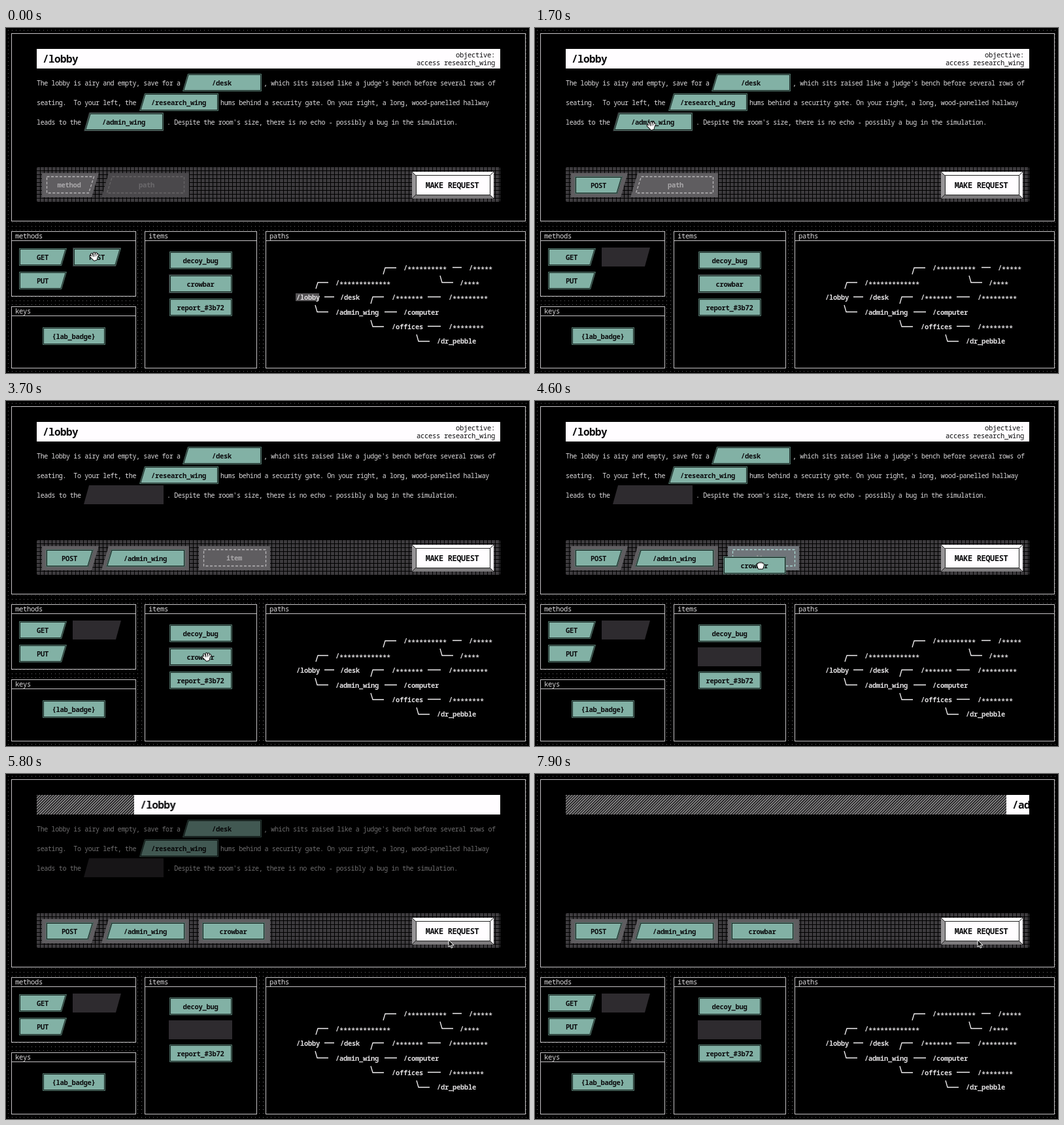
Write an HTML page that moves like this. It is 800 px wide and 528 px high and loops after 8 s.

```html
<!DOCTYPE html>
<html lang="en">
<head>
<meta charset="utf-8">
<title>Request game</title>
<style>
html, body { margin: 0; width: 100%; height: 100%; overflow: hidden; background: #000; }
svg { display: block; width: 800px; height: 528px; }
text { font: 10.5px "Noto Sans Mono", "DejaVu Sans Mono", monospace; letter-spacing: -.3px; fill: #dedcde; white-space: pre; }
.bold { font-weight: 600; }
.ink { fill: #0b0b0d; }
.mid { text-anchor: middle; }
.end { text-anchor: end; }
.story { font-size: 10px; letter-spacing: -.37px; }
.title { font-size: 16px; font-weight: 700; letter-spacing: -.6px; }
.make { font-size: 12px; font-weight: 600; letter-spacing: -.4px; }
.line { fill: #000; stroke: #c4c2c4; }
.tree { fill: none; stroke: #f4f2f4; stroke-width: 1.3; }
.dash { fill: none; stroke: #b8b6b8; stroke-width: 1.3; stroke-dasharray: 4 2.5; }
.hot { stroke: #a9d8d2; }
.faint { stroke: #676567; }
</style>
</head>
<body>
<svg viewBox="0 0 800 528">
  <defs>
    <pattern id="dots" width="6" height="6" patternUnits="userSpaceOnUse"><path d="M3 3h1v1h-1z" fill="#6a686a"/></pattern>
    <pattern id="grid" x="47" y="213" width="6" height="6" patternUnits="userSpaceOnUse"><path d="M0 0h5v5h-5z" fill="#3d3b3e"/></pattern>
    <pattern id="hatch" width="3" height="3" patternUnits="userSpaceOnUse" patternTransform="rotate(45)"><path d="M0 0h1.4v3h-1.4z" fill="#b4b2b4"/></pattern>
    <clipPath id="barClip"><rect x="47" y="32" width="709" height="30"/></clipPath>
  </defs>
  <g id="stage"></g>
</svg>
<script>
const LOOP = 8000;
const H = 27;
let css = '';

const pct = t => +(t * 100 / LOOP).toFixed(4) + '%';
const addAnim = (id, frames) =>
  css += `@keyframes ${id}{${frames}}#${id}{animation:${id} ${LOOP}ms steps(1) infinite}`;

// Visible only during the given [from, to] spans
const show = (id, ...spans) => addAnim(id, '0%{opacity:0}' +
  spans.map(([a, b]) => `${pct(a)}{opacity:1}${pct(b)}{opacity:0}`).join(''));

// Keys are [time, x, y, steps until the next key]
const move = (id, ...keys) => {
  const last = keys[keys.length - 1];
  addAnim(id, [...keys, [LOOP, last[1], last[2]]].map(([t, x, y, n = 1]) =>
    `${pct(t)}{transform:translate(${x}px,${y}px);animation-timing-function:steps(${n})}`).join(''));
};

const text = (x, y, s, cls = '') => `<text x="${x}" y="${y}" class="${cls}">${s}</text>`;
const group = (id, body) => `<g id="${id}">${body}</g>`;

// Quad with slanted left (l) or right (r) edge, shrunk by i
const quad = (x, y, w, h, l = 0, r = 0, i = 0) => {
  const dl = l * i / h, dr = r * i / h;
  return `M${x + l - dl + i} ${y + i}L${x + w - dr - i} ${y + i}L${x + w - r + dr - i} ${y + h - i}L${x + dl + i} ${y + h - i}Z`;
};
const shape = (d, fill, more = '') => `<path d="${d}" fill="${fill}" ${more}/>`;

const SLANT = { method: [0, 8], path: [8, 0], item: [0, 0] };
const WIDTH = { method: 73, path: 121, item: 96 };

const chip = (kind, x, y, label) => {
  const w = WIDTH[kind], [l, r] = SLANT[kind];
  return shape(quad(x, y, w, H, l, r), '#16211e') +
    shape(quad(x, y, w, H, l, r, .5), 'none', 'stroke="#55796f"') +
    shape(quad(x, y, w, H, l, r, 2), '#82b1a5') +
    text(x + w / 2 - .5, y + H / 2 + 4, label, 'bold ink mid');
};
const hole = (kind, x, y) =>
  shape(quad(x - 1, y - 1, WIDTH[kind] + 1, H + 2, ...SLANT[kind]), '#2e2b2f');

const panel = (x, y, w, h, name) =>
  `<rect x="${x + .5}" y="${y + .5}" width="${w}" height="${h}" class="line"/>` +
  (name ? `<path d="M${x} ${y + 14.5}h${w}" class="line"/>` + text(x + 6, y + 11, name) : '');

const titleBar = (name, extra = '') =>
  `<rect x="47" y="32" width="709" height="30" fill="#fffdff"/>` + text(56, 53, name, 'title ink') + extra;

const stars = n => `/<tspan dy="2">${'*'.repeat(n)}</tspan>`;

const panels = `<rect width="800" height="528" fill="url(#dots)"/>` +
  panel(8, 8, 786, 287) + panel(8, 311, 190, 99, 'methods') + panel(8, 426, 190, 94, 'keys') +
  panel(212, 311, 171, 209, 'items') + panel(397, 311, 397, 209, 'paths');

const bar = `<g clip-path="url(#barClip)">` +
  group('drift', `<rect x="39" y="32" width="725" height="30" fill="url(#hatch)"/>`) +
  group('oldBar', titleBar('/lobby', text(748, 45, 'objective:', 'ink end') + text(748, 57, 'access research_wing', 'ink end'))) +
  group('newBar', titleBar('/admin_wing')) + '</g>';

const story = group('story',
  text(47, 88, 'The lobby is airy and empty, save for a', 'story') + chip('path', 270, 70, '/desk') +
  text(394, 88, ", which sits raised like a judge's bench before several rows of", 'story') +
  text(47, 118, 'seating.  To your left, the', 'story') + chip('path', 204, 100, '/research_wing') +
  text(328, 118, 'hums behind a security gate. On your right, a long, wood-panelled hallway', 'story') +
  text(47, 148, 'leads to the', 'story') + hole('path', 120, 130) +
  text(246, 148, ". Despite the room's size, there is no echo - possibly a bug in the simulation.", 'story'));

// Request tray
const SLOT = '#5f5d60', HOVER = '#6b6e73';
const mBox = quad(55, 222, 87, 37, 0, 11), mLine = quad(62.5, 227.5, 72, 25, 0, 8);
const pBox = quad(146, 222, 134, 37, 11, 0), pLine = quad(154.5, 227.5, 118, 25, 8, 0);
const iBox = quad(295, 222, 109, 37), iLine = quad(302.5, 227.5, 95, 25);
const label = (x, s, fill) => `<text x="${x}" y="244" class="bold mid" style="fill:${fill}">${s}</text>`;
const dash = (id, d, cls = '') => group(id, `<path d="${d}" class="dash ${cls}"/>`);

const button = shape('M621 220H746L740 226H627Z', '#fff') + shape('M746 220V261L740 255V226Z', '#f4f2f4') +
  shape('M621 220V261L627 255V226Z', '#969496') + shape('M621 261H746L740 255H627Z', '#7c7a7c') +
  shape('M627.5 225.5H740.5V255.5H627.5Z', '#fffdff', 'stroke="#222"') +
  `<path d="M621 220l6 6M746 220l-6 6M621 261l6-6M746 261l-6-6" stroke="#222"/>` +
  text(682.5, 244.5, 'MAKE REQUEST', 'make ink mid');

const tray = `<rect x="47" y="213" width="709" height="53" rx="2" fill="url(#grid)"/>` +
  shape(mBox, SLOT) + group('mHover', shape(mBox, HOVER)) + label(96.5, 'method', '#a9a7a9') +
  dash('mDash', mLine) + dash('mHot', mLine, 'hot') +
  group('pOff', shape(pBox, '#4a484b') + `<path d="${pLine}" class="dash faint"/>` + label(215, 'path', '#6b696c')) +
  group('pOn', shape(pBox, SLOT) + group('pHover', shape(pBox, HOVER)) + label(215, 'path', '#a9a7a9')) +
  dash('pDash', pLine) + dash('pHot', pLine, 'hot') +
  group('iOn', shape(iBox, SLOT) + group('iHover', shape(iBox, '#70757a')) + label(349, 'item', '#a9a7a9')) +
  dash('iDash', iLine) + dash('iHot', iLine, 'hot') + button;

const lists = chip('method', 20, 337, 'GET') + chip('method', 20, 373, 'PUT') +
  chip('item', 56, 458, '{lab_badge}') + chip('item', 250, 342, 'decoy_bug') + chip('item', 250, 414, 'report_#3b72') +
  hole('method', 103, 337) + hole('item', 250, 378);

const nodes = [
  [608, 367, stars(10)], [708, 367, stars(5)], [504, 390, stars(13)], [694, 390, stars(4)],
  [444, 412, '/lobby'], [511, 412, '/desk'], [590, 412, stars(7)], [677, 412, stars(9)],
  [504, 435, '/admin_wing'], [608, 435, '/computer'], [590, 457, '/offices'], [677, 457, stars(8)],
  [659, 479, '/dr_pebble']
];
const tree = group('blink', `<rect x="443" y="406" width="36" height="12" fill="#555355"/>`) +
  `<path class="tree" d="M577 377l3-10h17M683 366.5h14M474 399l3-9.5h16M664 379l3 10.5h17M487 411.5h15M473 424l3 10.5h17M579 434.5h19M558 422l3-10.5h17M645 411.5h20M558 447l3 10h17M645 456.5h20M628 469l3 10.5h17"/>` +
  nodes.map(([x, y, s]) => text(x, y + 4, s, 'bold')).join('');

const movers = group('post', chip('method', 103, 337, 'POST')) +
  group('admin', chip('path', 120, 130, '/admin_wing')) + group('crowbar', chip('item', 250, 378, 'crowbar'));

const hand = d => `<path d="${d}" fill="#111" stroke="#111" stroke-width="3.6" stroke-linejoin="round" stroke-linecap="round"/>` +
  `<path d="${d}" fill="#fff" stroke="#fff" stroke-width="1.7" stroke-linejoin="round" stroke-linecap="round"/>`;
const cursor = group('cursor',
  group('open', hand('M-2.5 1-4-4M-.3 0V-5.5M2 0 3-5M3.5 1 5.5-3M-3 2-5.5-.5M-3 2 0 5 3 4 3.5 1-2.5 1Z')) +
  group('fist', hand('M-3-2V-3M-1-2V-4M1.2-2V-4M3.4-2V-3M-4 0-2.5 4H2.5L4 0V-2H-4Z')) +
  group('arrow', `<path d="M-3-6V5L-.5 2.5 1.3 6.3 3 5.5 1.3 2H5Z" fill="#111" stroke="#fff"/>`));

document.getElementById('stage').innerHTML = panels + bar + story + tray + lists + tree + movers + cursor;

move('cursor', [0, 135, 350], [400, 135, 350, 4], [800, 107, 250, 2], [1000, 94, 240],
  [1200, 94, 240, 5], [1700, 178, 150], [2000, 178, 150, 4], [2400, 206, 247, 2], [2600, 211, 247],
  [2800, 211, 247, 9], [3700, 307, 392], [3900, 307, 392, 7], [4600, 345, 252, 2], [4800, 357, 241, 7], [5500, 680, 260]);
move('post', [0, 0, 0], [400, 0, 0, 4], [800, -29, -99, 2], [1000, -42, -110]);
move('admin', [0, 0, 0], [2000, 0, 0, 4], [2400, 27, 84, 2], [2600, 33, 97]);
move('crowbar', [0, 0, 0], [3900, 0, 0, 7], [4600, 38, -140, 2], [4800, 50, -151]);
move('oldBar', [0, 0, 0], [5600, 19, 0, 11], [6700, 736, 0]);
move('newBar', [0, 720, 0], [7900, 674, 0]);

show('open', [0, 400], [1000, 1300], [1600, 2000], [2600, 2900], [3600, 3900]);
show('fist', [400, 1000], [2000, 2600], [3900, 4800]);
show('arrow', [1300, 1600], [2900, 3600], [4800, LOOP]);
show('mHover', [700, 1000]);
show('mDash', [0, 200]);
show('mHot', [700, 1000]);
show('pOff', [0, 1000]);
show('pOn', [1000, LOOP]);
show('pHover', [2300, 2600]);
show('pDash', [1000, 1200], [1700, 2000]);
show('pHot', [2000, 2200]);
show('iOn', [2600, LOOP]);
show('iHover', [4400, 4800]);
show('iDash', [2600, 2900], [3400, 3900]);
show('iHot', [4400, 4800]);
show('blink', ...Array.from({ length: 8 }, (_, i) => [i * 1000, i * 1000 + 500]));

addAnim('story', `0%{opacity:1}${pct(5500)}{opacity:1;animation-timing-function:steps(6)}${pct(6100)},100%{opacity:0}`);
// One hatch period measured along x
css += `@keyframes drift{to{transform:translateX(${3 * Math.SQRT2}px)}}#drift{animation:drift 400ms steps(4) infinite}`;

const style = document.createElement('style');
style.textContent = css;
document.head.append(style);
</script>
</body>
</html>
```
